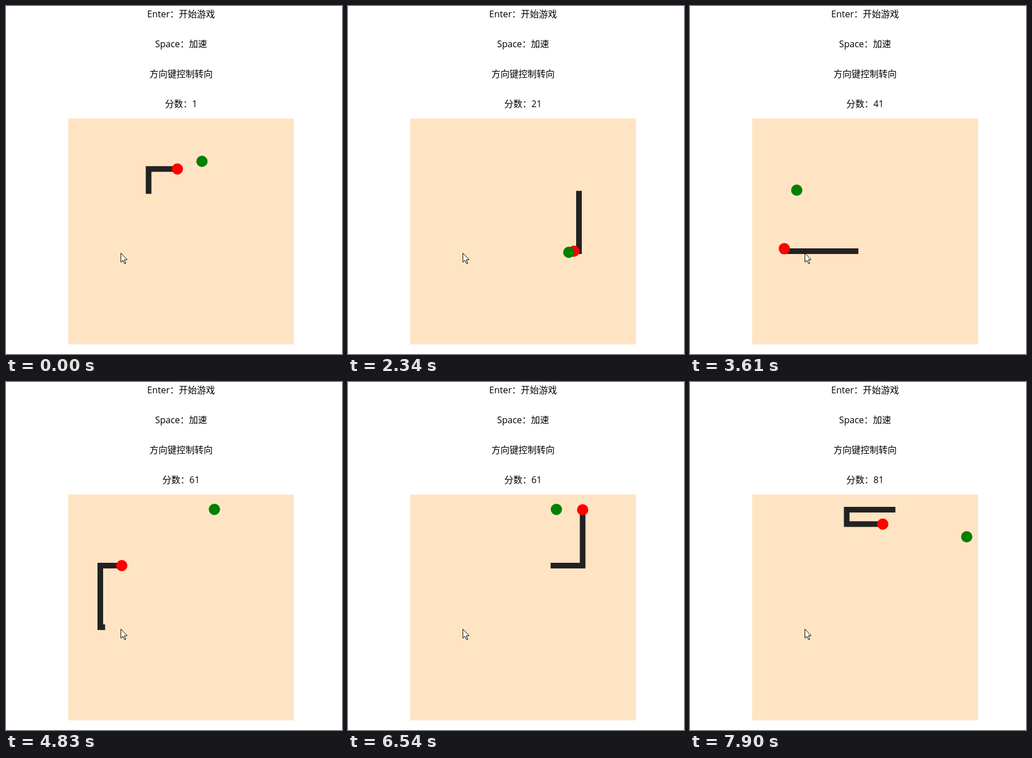
An HTML page that plays this animation: 595 px wide and 616 px high, repeating every 8000 ms.

```html
<!DOCTYPE html>
<html lang="zh-CN">
<head>
<meta charset="utf-8">
<title>Snake</title>
<style>
  html, body { margin: 0; width: 100%; height: 100%; overflow: hidden; background: #fff; }
  svg { display: block; }
  text { font: 16px "Open Sans", "Noto Sans CJK SC", "Noto Sans CJK", sans-serif; text-anchor: middle; }
  #body { fill: none; stroke: #222; stroke-width: 10; stroke-linecap: square; }
</style>
</head>
<body>
<svg width="595" height="616" viewBox="0 0 595 616">
  <text x="310" y="20">Enter：开始游戏</text>
  <text x="310" y="73">Space：加速</text>
  <text x="310" y="126">方向键控制转向</text>
  <text x="310" y="179" id="score">分数：1</text>
  <rect x="110" y="199" width="400" height="400" fill="bisque"/>
  <path id="body" d="M252.5 327.5V288.5H345V269H409V434H167V325H415.5V226H277.5V251.5H345"/>
  <circle id="head" r="10" fill="red"/>
  <circle id="food" r="10" fill="green"/>
  <path d="M203.5 437.5v16l3.5-3.5 2.5 5.5h2.5l-2.5-6.5h5z" fill="#fff" stroke="#000"/>
</svg>
<script>
const LOOP = 8000, TICK = 140, LEAD = 80;      // ms
const START = 90, SPEED = 13.9, BOOST = 25;    // px, px per tick
const LENGTH = 90.5, GROWTH = 20, REACH = 8;   // px

// Ticks between which the boost key is held
const boosts = [[10.5, 13], [18.5, 23], [34.3, 40.7], [50, 52.9], [56.36, 57]];
const foods = [[347, 275], [391, 436], [189, 326], [369, 225.5], [490, 274]];

const [body, head, food, score] =
  ["body", "head", "food", "score"].map(id => document.getElementById(id));

// Distance along the path at which the head first reaches each food in turn
const meals = [];
for (let d = START; d < body.getTotalLength(); d++) {
  const p = body.getPointAtLength(d), [x, y] = foods[meals.length];
  if (Math.hypot(p.x - x, p.y - y) < REACH) meals.push(d);
}

function travelled(tick) {
  const held = boosts.reduce((sum, [from, to]) =>
    sum + Math.max(0, Math.min(tick, to) - from), 0);
  return START + SPEED * tick + BOOST * held;
}

function place(circle, x, y) {
  circle.setAttribute("cx", x);
  circle.setAttribute("cy", y);
}

function draw(tick) {
  const d = travelled(tick);
  const eaten = meals.filter(m => m <= d);
  // The tail waits while the snake grows
  const length = eaten.reduce((sum, m) => sum + Math.min(GROWTH, d - m), LENGTH);
  body.setAttribute("stroke-dasharray", `${length} 9999`);
  body.setAttribute("stroke-dashoffset", length - d);
  const p = body.getPointAtLength(d);
  place(head, p.x, p.y);
  place(food, ...foods[eaten.length]);
  score.textContent = `分数：${1 + 20 * eaten.length}`;
}

const start = performance.now();
function frame() {
  const t = (performance.now() - start) % LOOP;
  draw(Math.floor((t + LEAD) / TICK));
  requestAnimationFrame(frame);
}
frame();
</script>
</body>
</html>
```
